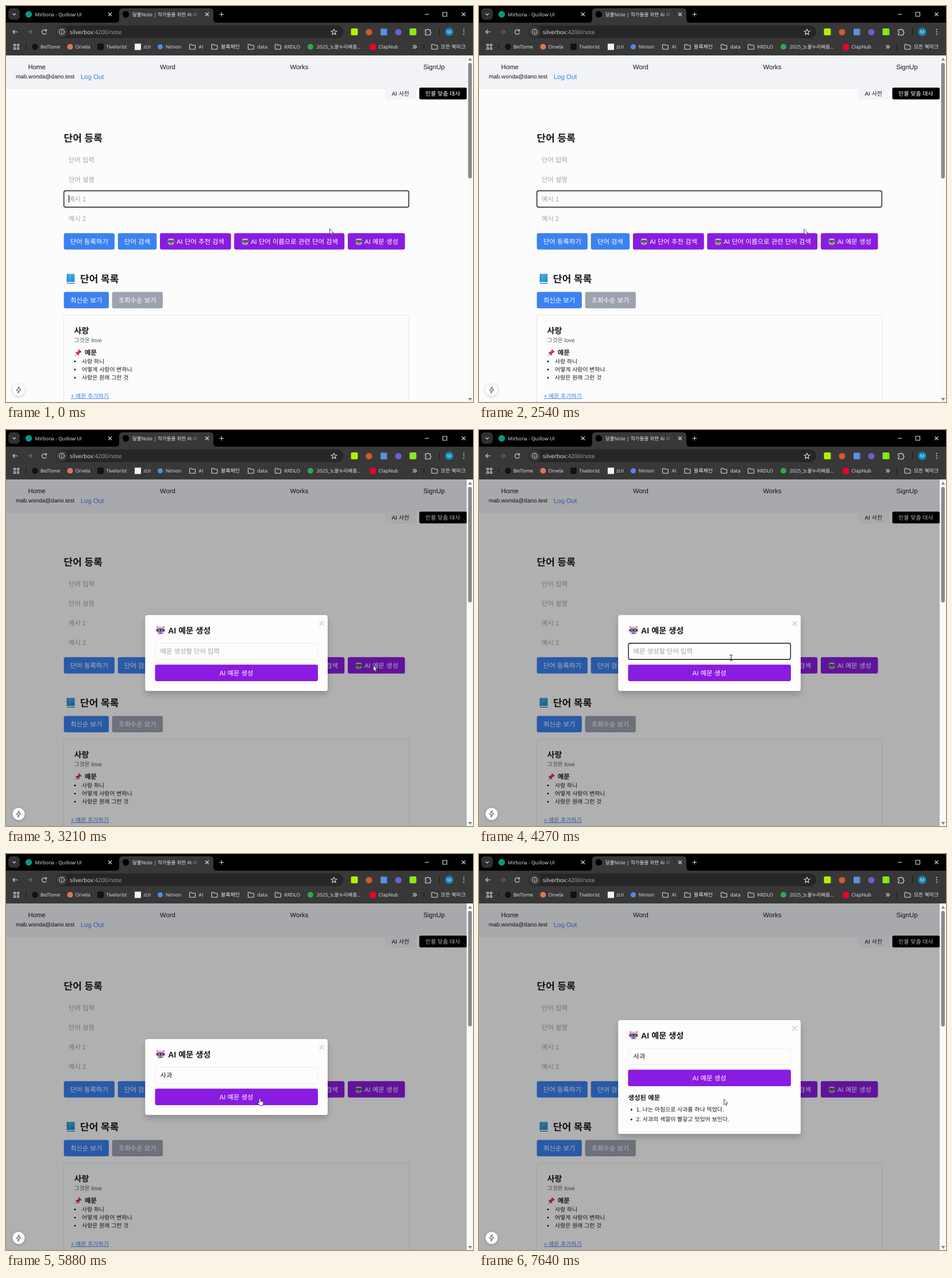
Recreate the animation shown at these times as an HTML page. Size 813 by 689 pixels, loop 8000 ms.

```html
<!DOCTYPE html>
<html lang="ko">
<head>
<meta charset="utf-8">
<title>단어 등록</title>
<style>
html, body { margin: 0; width: 100%; height: 100%; overflow: hidden; background: #fcfcfc; }
svg.stage { display: block; width: 100vw; height: 100vh; text-rendering: geometricPrecision; }
text { font: 11.36px "Liberation Sans", "Noto Sans CJK KR", sans-serif; fill: #171717; white-space: pre; }
.ui text { font: 8.5px "Open Sans", "Noto Sans CJK KR", sans-serif; fill: #e9e9e9; }
.ui .url { font-size: 9.8px; }
.sm { font-size: 9.94px; }
.h1 { font-size: 17.04px; font-weight: 700; }
.h2 { font-size: 14.2px; font-weight: 700; }
.b { font-weight: 700; }
.w text, text.w { fill: #fff; font-weight: 500; }
.hint text, text.hint { fill: #9ca3af; }
.link { fill: #3f7de8; }
.blue { fill: #3b82f0; }
.purple { fill: #8a1be0; }
.line { fill: none; stroke: #dedede; stroke-width: 1.1; }
.mid { text-anchor: middle; }
.bot { --head: #cdbfd9; --ear: #dd5570; --visor: #3b2c60; }
.gray-bot { --head: #c4c2c8; --ear: #7b7480; --visor: #2d2b33; }

/* One 8 s loop: 1% = 80 ms */
.cursor, .step { animation: 8s linear infinite; }
.step { animation-timing-function: step-end; }
.cursor { animation-name: move; animation-timing-function: ease-in-out; }
.arrow { animation-name: arrow; }
.beam { animation-name: beam; }
.hand { animation-name: hand; }
.page-focus { animation-name: page-focus; }
.page-caret { animation-name: page-caret; }
.dialog { animation-name: dialog; }
.lift { animation-name: lift; }
.panel { animation-name: panel; }
.result { animation-name: result; }
.field-focus { animation-name: field-focus; }
.field-caret { animation-name: field-caret; }
.typing { animation-name: typing; }

@keyframes move {
  0%, 31.4% { transform: translate(563px, 387px); }
  31.75% { transform: translate(565.5px, 387.5px); }
  38.75%, 42.1% { transform: translate(639px, 409px); }
  47.1%, 66.7% { transform: translate(439px, 396px); }
  71%, 79.2% { transform: translate(442px, 425px); }
  79.75%, 81.7% { transform: translate(440px, 424px); }
  83%, 91% { transform: translate(437px, 424px); }
  95.5%, 100% { transform: translate(426px, 426px); }
}
@keyframes arrow { 0% { opacity: 1; } 45.5% { opacity: 0; } 91% { opacity: 1; } }
@keyframes beam { 0% { opacity: 0; } 45.5% { opacity: 1; } 68.2% { opacity: 0; } }
@keyframes hand { 0% { opacity: 0; } 68.2% { opacity: 1; } 91%, 100% { opacity: 0; } }
@keyframes page-focus { 0% { opacity: 1; } 39.25%, 100% { opacity: 0; } }
@keyframes page-caret {
  0%, 13%, 26.375% { opacity: 1; }
  6.75%, 19.625%, 31.75%, 100% { opacity: 0; }
}
@keyframes dialog { 0% { opacity: 0; } 40.1%, 100% { opacity: 1; } }
@keyframes lift { 0% { transform: none; } 91%, 100% { transform: translateY(-33px); } }
@keyframes panel { 0% { height: 132px; } 91%, 100% { height: 198px; } }
@keyframes result { 0% { opacity: 0; } 91%, 100% { opacity: 1; } }
@keyframes field-focus { 0% { opacity: 0; } 53.3% { opacity: 1; } 73.45%, 100% { opacity: 0; } }
@keyframes field-caret {
  0% { opacity: 0; transform: none; }
  54.25% { opacity: 1; transform: none; }
  56.375% { opacity: 1; transform: translateX(10.5px); }
  59.4% { opacity: 1; transform: translateX(21px); }
  66.75%, 100% { opacity: 0; transform: translateX(21px); }
}
@keyframes typing {
  0% { transform: none; }
  56.375% { transform: translateY(-40px); }
  57.4% { transform: translateY(-80px); }
  58.4% { transform: translateY(-120px); }
  59.4% { transform: translateY(-160px); }
  60.5%, 100% { transform: translateY(-200px); }
}
</style>
</head>
<body>
<svg class="stage" viewBox="0 0 813 689">
<defs>
  <linearGradient id="fade"><stop stop-color="#383838" stop-opacity="0"/><stop offset="1" stop-color="#383838"/></linearGradient>
  <linearGradient id="cover" x2="1" y2="1"><stop stop-color="#55c0f0"/><stop offset="1" stop-color="#1c7fc4"/></linearGradient>
  <filter id="soft" x="-20%" y="-20%" width="140%" height="150%"><feDropShadow dx="0" dy="6" stdDeviation="6" flood-opacity=".2"/></filter>
  <filter id="glow" x="-50%" y="-50%" width="200%" height="200%"><feDropShadow dx="0" dy="1" stdDeviation="2.5" flood-opacity=".25"/></filter>
  <clipPath id="field"><rect x="262" y="372" width="279" height="27"/></clipPath>
  <path id="x" class="line" d="M-3-3 3 3M3-3-3 3"/>
  <path id="folder" class="line" d="M-5-3.2q0-1 1-1h2.6l1.4 1.5h4q1 0 1 1v5q0 1-1 1h-8q-1 0-1-1z"/>
  <symbol id="robot" viewBox="0 0 16 16">
    <rect y="5" width="16" height="6" rx="1.8" style="fill:var(--ear)"/>
    <circle cx="2.5" cy="2.3" r="1.5" style="fill:var(--ear)"/><circle cx="13.500" cy="2.300" r="1.500" style="fill:var(--ear)"/>
    <rect x="1.6" y="1.6" width="12.8" height="13.600" rx="4.5" style="fill:var(--head)"/>
    <rect x="1.800" y="5.2" width="12.400" height="5" rx="2" style="fill:var(--visor)"/>
    <circle cx="5.3" cy="7.700" r="1.2" fill="#b9d8f4"/><circle cx="10.700" cy="7.700" r="1.200" fill="#b9d8f4"/>
    <rect x="5" y="12" width="6" height="1.4" rx=".7" style="fill:var(--visor)"/>
  </symbol>
</defs>

<!-- page -->
<rect width="813" height="689" fill="#fcfcfc"/>
<rect y="86" width="802" height="57" fill="#f1f3f6"/>
<path d="M0 143.5H802" stroke="#eceef1"/>
<text x="38.500" y="109.500">Home</text>
<text x="268" y="109.500">Word</text>
<text x="494.500" y="109.500">Works</text>
<text x="726.500" y="109.500">SignUp</text>
<text class="sm" x="17" y="126">mab.wonda@dano.test</text>
<text class="link" x="130" y="126.500" style="fill:#3f7de8">Log Out</text>

<rect x="660" y="142" width="54" height="20.500" rx="3" fill="#f3f4f6"/>
<text class="sm" x="671.500" y="155.500">AI 사전</text>
<rect x="719.500" y="142" width="82.800" height="20.500" rx="3"/>
<text class="sm w" x="730.300" y="155.500">인물 맞춤 대사</text>

<text class="h1" x="100.500" y="236">단어 등록</text>
<g class="hint">
  <text x="109" y="271.500">단어 입력</text>
  <text x="109" y="305.500">단어 설명</text>
  <text x="109" y="339.500">예시 1</text>
  <text x="109" y="373.500">예시 2</text>
</g>
<rect class="step page-focus" x="100.800" y="321.500" width="600.500" height="28.500" rx="3" fill="none" stroke="#171717" stroke-width="1.400"/>
<rect class="step page-caret" x="109" y="329" width="1" height="13"/>

<g class="blue">
  <rect x="100.700" y="395.200" width="88.300" height="28.500" rx="3"/>
  <rect x="194.800" y="395.200" width="67.500" height="28.500" rx="3"/>
  <rect x="100.700" y="497.500" width="78.300" height="28.500" rx="3"/>
</g>
<g class="purple">
  <rect x="268" y="395.200" width="123.700" height="28.500" rx="3"/>
  <rect x="397.200" y="395.200" width="192" height="28.500" rx="3"/>
  <rect x="595" y="395.200" width="99.500" height="28.500" rx="3"/>
</g>
<rect x="184.700" y="497.500" width="88.300" height="28.500" rx="3" fill="#9ca3af"/>
<g class="w">
  <text x="112" y="413.500">단어 등록하기</text>
  <text x="206" y="413.500">단어 검색</text>
  <text x="297" y="413.500">AI 단어 추천 검색</text>
  <text x="426" y="413.500">AI 단어 이름으로 관련 단어 검색</text>
  <text x="624" y="413.500">AI 예문 생성</text>
  <text x="112" y="515.500">최신순 보기</text>
  <text x="195.700" y="515.500">조회수순 보기</text>
</g>
<g class="gray-bot">
  <use href="#robot" x="281" y="403.500" width="12.500" height="12.500"/>
  <use href="#robot" x="410" y="403.500" width="12.500" height="12.500"/>
  <use href="#robot" x="608" y="403.500" width="12.500" height="12.500"/>
</g>

<path d="M106 466.500H119.500V482H107.500q-2 0-2-2z" fill="#e4eef5"/>
<path d="M107 466H118.500q1 0 1 1V480H107.500q-2 0-2 1.500V467.500q0-1.500 1.500-1.500z" fill="url(#cover)"/>
<path d="M107.500 466V480M106 482.500H120" stroke="#1769a5"/>
<text class="h1" x="129" y="480.500">단어 목록</text>

<rect x="100.500" y="538" width="601" height="170" rx="3" fill="none" stroke="#e5e7eb"/>
<text class="h2" x="118.500" y="569.500">사랑</text>
<text class="sm" x="118.500" y="585" style="fill:#4b5563">그것은 love</text>
<path d="M124.500 604.500 120.500 608.500" stroke="#8c98a3" stroke-width="1.200"/>
<path d="M127 597 132 602l-1.500 1-1-.3-2.500 2.500.3 2.300-1.300.5-5-5 .8-1.300 2.200.3 2.500-2.500-.3-1z" fill="#d9304f"/>
<text class="b" x="137" y="606.500">예문</text>
<circle cx="120" cy="618.500" r="1.400"/><circle cx="120" cy="632.700" r="1.400"/><circle cx="120" cy="646.900" r="1.400"/>
<text class="sm" x="132" y="621.700">사랑 하니</text>
<text class="sm" x="132" y="635.900">어떻게 사랑이 변하니</text>
<text class="sm" x="132" y="650.100">사랑은 원래 그런 것</text>
<text class="sm link" x="112.800" y="681.500" style="fill:#3f7de8;text-decoration:underline">+ 예문 추가하기</text>

<!-- dialog -->
<g class="step dialog">
  <rect y="86" width="802" height="603" opacity=".3"/>
  <g class="step lift">
    <rect class="step panel" x="242.300" y="322" width="317.700" height="132" rx="4" fill="#fdfdfd" filter="url(#soft)"/>
    <path d="M545.500 332.500l8 8M553.500 332.500l-8 8" stroke="#9ca3af"/>
    <use class="bot" href="#robot" x="261" y="340.500" width="16" height="16"/>
    <text class="h2" x="282" y="353.500">AI 예문 생성</text>
    <rect x="260" y="371" width="282.500" height="28.500" rx="3" fill="none" stroke="#ebebec"/>
    <rect class="step field-focus" x="260.200" y="371" width="282.200" height="28.300" rx="3" fill="none" stroke="#171717" stroke-width="1.400"/>
    <g clip-path="url(#field)">
      <g class="step typing">
        <text class="hint" x="268.500" y="389">예문 생성할 단어 입력</text>
        <text x="268.500" y="429">ㅅ</text>
        <text x="268.500" y="469">사</text>
        <text x="268.500" y="509">삭</text>
        <text x="268.500" y="549">사고</text>
        <text x="268.500" y="589">사과</text>
      </g>
      <rect class="step field-caret" x="268.500" y="378.500" width="1" height="13"/>
    </g>
    <rect class="purple" x="259.500" y="408.300" width="283.500" height="28.700" rx="3"/>
    <text class="w mid" x="401" y="426.500">AI 예문 생성</text>
    <g class="step result">
      <text class="b" x="259.700" y="460.500">생성된 예문</text>
      <circle cx="265.500" cy="478" r="1.400"/><circle cx="265.500" cy="495" r="1.400"/>
      <text class="sm" x="273.800" y="481">1. 나는 아침으로 사과를 하나 먹었다.</text>
      <text class="sm" x="273.800" y="498">2. 사과의 색깔이 빨갛고 맛있어 보인다.</text>
    </g>
  </g>
</g>

<circle cx="22" cy="668" r="10.500" fill="#fff" filter="url(#glow)"/>
<path d="M23 662.500 18 669h3.500l-.7 4.800L26 667h-3.600z" fill="none" stroke="#444" stroke-linejoin="round"/>

<!-- scrollbar -->
<rect x="802" y="86" width="11" height="603" fill="#fafafa"/>
<rect x="804.500" y="99" width="6.500" height="201" rx="3.250" fill="#8a8a8a"/>
<path d="M804.500 95h7L808 90zM804.500 682h7l-3.500 5z" fill="#8a8a8a"/>

<!-- browser -->
<g class="ui">
  <rect width="813" height="86"/>
  <path d="M0 29H191q6 0 6-6V10q0-6 6-6H355q6 0 6 6V23q0 6 6 6H813V86H0z" fill="#383838"/>
  <rect x="4" y="4" width="20" height="20" rx="6" fill="#303030"/>
  <path class="line" d="M11.500 13l2.700 2.700L17 13"/>
  <circle cx="39.500" cy="14.500" r="5.700" fill="#0b9683"/>
  <text x="50.500" y="18">Mirbona - Quillow UI</text>
  <use href="#x" x="181" y="14.500"/>
  <circle cx="208.500" cy="14.500" r="5.700"/>
  <text x="220" y="18">달풀Note | 작가들을 위한 AI 사</text>
  <rect x="322" y="6" width="16" height="18" fill="url(#fade)"/>
  <rect x="338" y="6" width="18" height="18" fill="#383838"/>
  <use href="#x" x="350" y="14.500"/>
  <path class="line" d="M371.500 14.500h7.500M375.250 10.700v7.500M729 14.500h7M760.500 11h7v7h-7z"/>
  <use href="#x" x="796.500" y="14.500"/>

  <path class="line" d="M20 45h-8M15.500 41.300 11.800 45l3.700 3.700"/>
  <path class="line" d="M37 45h8M41.500 41.300 45.200 45l-3.700 3.700" style="stroke:#777"/>
  <path class="line" d="M69.500 42.500A4 4 0 1 0 70.500 46M70.500 40.500v3h-3"/>
  <rect x="86" y="34" width="501" height="22" rx="11" fill="#262626"/>
  <circle cx="97" cy="45" r="10" fill="#383838"/>
  <circle class="line" cx="97" cy="45" r="4.500"/>
  <path class="line" d="M97 44.500v3M97 42v1.200"/>
  <text class="url" x="111" y="48.600">silverbox<tspan fill="#a6a6a6">:4200/note</tspan></text>
  <path class="line" d="M571 40.300l1.400 3.200 3.500.3-2.700 2.300.8 3.400-3-1.800-3 1.800.8-3.400-2.700-2.300 3.500-.3z"/>
  <rect x="600.500" y="39" width="12" height="12" rx="2" fill="#b4f000"/>
  <circle cx="632" cy="45.500" r="5.500" fill="#d9582b"/>
  <rect x="652" y="39.500" width="11.500" height="11.500" rx="1" fill="#5b8ee0"/>
  <circle cx="683" cy="45.500" r="5.500" fill="#6a61d0"/>
  <rect x="702.500" y="39" width="12" height="12" rx="2" fill="#86e81a"/>
  <path class="line" d="M730 41.500h2.700a1.500 1.500 0 0 1 3 0h2.800v3.200a1.500 1.500 0 0 1 0 3v2.800h-8.500v-3a1.500 1.500 0 0 0 0-3z"/>
  <path d="M754.500 39v12M727.500 66v10M34.500 66v10" stroke="#141414"/>
  <circle cx="771.500" cy="45" r="7.300" fill="#0d87b5"/>
  <text class="mid" x="771.500" y="48">M</text>
  <g fill="#dedede"><circle cx="797" cy="41" r="1"/><circle cx="797" cy="45" r="1"/><circle cx="797" cy="49" r="1"/></g>

  <path class="line" d="M13.500 66.500h3v3h-3zM19.500 66.500h3v3h-3zM13.500 72.500h3v3h-3zM19.500 72.500h3v3h-3z"/>
  <circle cx="50.500" cy="71" r="5.300" fill="#111"/>
  <text x="60" y="74">BelTome</text>
  <circle cx="111.500" cy="71" r="5" fill="#d97757"/>
  <text x="120.800" y="74">Orvela</text>
  <rect x="159" y="65.500" width="11" height="11" rx="2" fill="#111"/>
  <text x="174.500" y="74">Tivelorist</text>
  <rect x="224" y="65.500" width="11" height="11" fill="#f5f5f5"/>
  <text x="239" y="74">zUI</text>
  <circle cx="268.500" cy="71" r="4.500" fill="#4f8ae8"/>
  <text x="278" y="74">Nimori</text>
  <use href="#folder" x="324.500" y="71"/><text x="335.500" y="74">AI</text>
  <use href="#folder" x="363" y="71"/><text x="374" y="74" style="font-size:9px">블록체인</text>
  <use href="#folder" x="426.500" y="71"/><text x="437.500" y="74">data</text>
  <use href="#folder" x="473.500" y="71"/><text x="484.500" y="74">KRDLO</text>
  <circle cx="530" cy="71" r="5" fill="#2da94f"/>
  <text x="540.800" y="74">2025_노을누리배움...</text>
  <rect x="633.500" y="66" width="10.500" height="10.500" rx="2" fill="#f00028"/>
  <text x="648.500" y="74">ClapNub</text>
  <path class="line" d="M708.500 68l3 3-3 3M711.800 68l3 3-3 3"/>
  <use href="#folder" x="746" y="71"/><text x="757" y="74" style="font-size:8.900px">모든 북마크</text>
</g>

<!-- pointer -->
<g class="cursor">
  <path class="step arrow" d="M.5.500V10.300L2.700 8.300 4.200 11.500 5.800 10.800 4.400 7.700H7.200z" fill="#fff" stroke="#222" stroke-width=".8"/>
  <path class="step beam" d="M-2.500-4.500H-.7L0-4 .7-4.500H2.500M0-4V4.500M-2.500 5H-.7L0 4.500 .7 5H2.500" fill="none" stroke="#222"/>
  <path class="step hand" d="M-1.300 1.500a1.200 1.200 0 0 1 2.400 0V5l3.800 1q1.300.4 1.200 1.800L5.600 10.500 5 12.800H-.2L-3.800 8.300q-.4-1.400 1-1.300l1.500 1.200z" fill="#fff" stroke="#222" stroke-width=".8" stroke-linejoin="round"/>
</g>
</svg>
</body>
</html>
```
